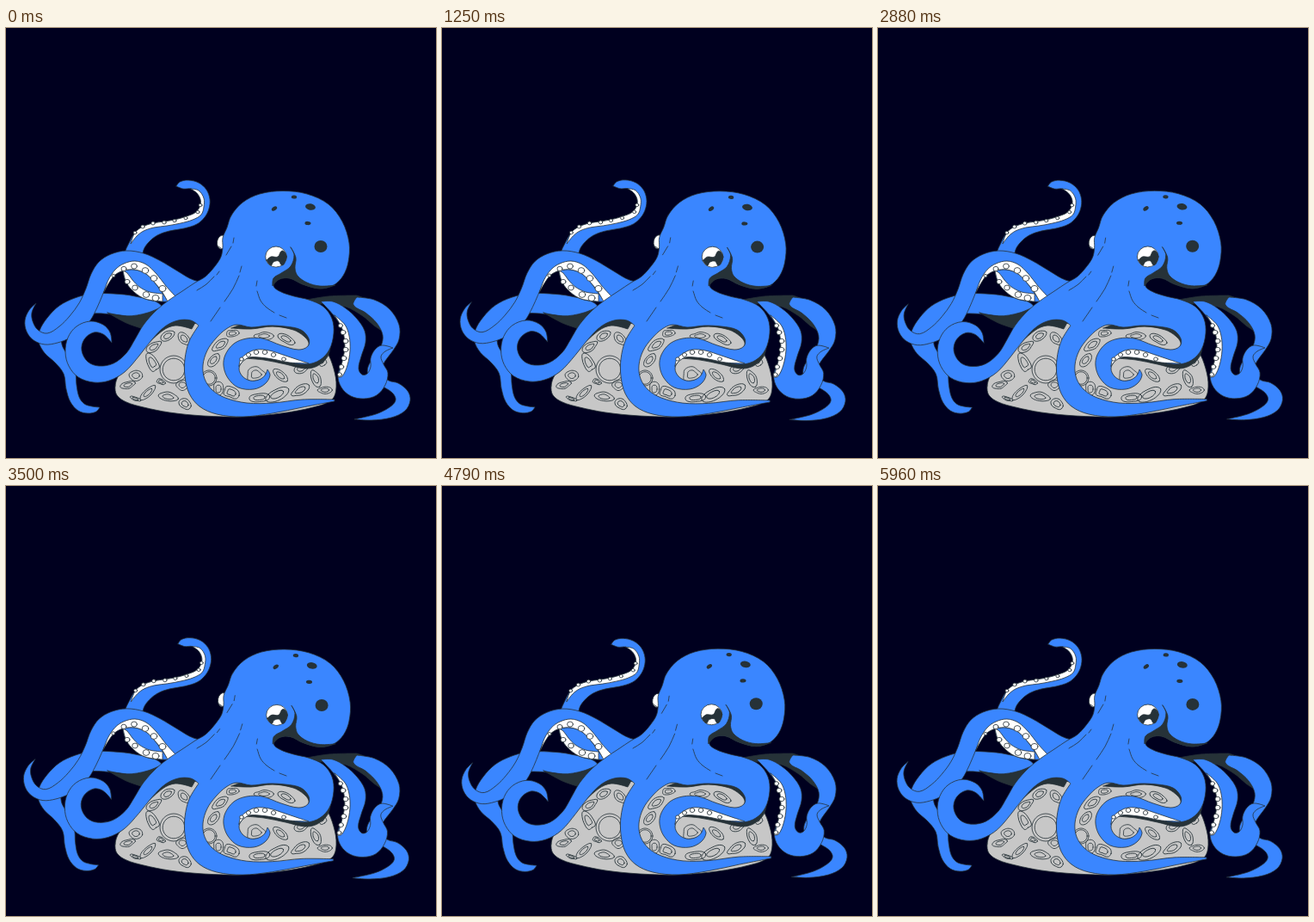
Recreate the animation shown at these times as an HTML page. Size 500x500 px, loop 6 s.

```html
<!DOCTYPE html>
<html lang="en">
<head>
<meta charset="utf-8">
<title>Octopus</title>
<style>
html, body { margin: 0; width: 100%; height: 100%; overflow: hidden; background: #00001f; }
svg { display: block; width: 100vw; height: 100vh; }
svg * { stroke-linejoin: round; stroke-linecap: round; }
</style>
</head>
<body>
<svg id="stage" viewBox="0 0 500 500">
  <defs><clipPath id="rockClip"><path id="rockEdge"/></clipPath></defs>
</svg>
<script>
const NS = "http://www.w3.org/2000/svg";
const stage = document.getElementById("stage");
const BLUE = "#3a86ff", INK = "#263238", WHITE = "#fff", GREY = "#c7c7c7";
const PERIOD = 3000;
const moving = [];

// ---- motion: each field gives the shift of a point at full swing ----
const ramp = (a, b, v) => {
  const u = Math.min(1, Math.max(0, (v - a) / (b - a)));
  return u * u * (3 - 2 * u);
};
const spin = (px, py, angle, weight) => (x, y) => {
  const k = angle * weight(x, y);
  return [-(y - py) * k, (x - px) * k];
};
const sum = (...fields) => (x, y) => fields.reduce((acc, f) => {
  const d = f(x, y);
  return [acc[0] + d[0], acc[1] + d[1]];
}, [0, 0]);

const headField = spin(290, 335, 0.016, (x, y) => ramp(330, 275, y) * ramp(225, 258, x));
const curlField = spin(200, 340, 0.022, x => ramp(195, 120, x));
const frontField = (x, y) => {
  const k = ramp(255, 382, x) * ramp(422, 432, y);
  return [-1.4 * k, 2 * k];
};
const bodyField = sum(headField, curlField, frontField);
const raisedField = (x, y) => {
  const k = Math.max(0, 265 - y);
  return [0.026 * k, -0.006 * k];
};
const loopField = spin(155, 275, 0.025, x => ramp(170, 95, x));
const backField = spin(130, 330, 0.019, x => ramp(150, 95, x));
const outerField = spin(370, 345, 0.021, (x, y) => Math.max(ramp(405, 440, x), ramp(370, 410, y)));
const innerField = spin(370, 345, 0.012, (x, y) => ramp(345, 420, y));

// ---- shapes: smooth curves through points, "!" marks a corner ----
const points = text => text.trim().split(/\s+/).map(word => {
  const [x, y] = word.replace("!", "").split(",").map(Number);
  return { x, y, corner: word.endsWith("!") };
});

function curve(pts, closed) {
  const n = pts.length;
  const at = i => closed ? pts[(i + n) % n] : pts[Math.min(n - 1, Math.max(0, i))];
  const handle = (i, dir) => {
    const p = at(i);
    if (p.corner) return [p.x, p.y];
    const a = at(i - 1), b = at(i + 1), near = dir > 0 ? b : a;
    const span = Math.hypot(b.x - a.x, b.y - a.y) || 1;
    const k = dir * Math.hypot(near.x - p.x, near.y - p.y) / span / 3;
    return [p.x + (b.x - a.x) * k, p.y + (b.y - a.y) * k];
  };
  const fmt = v => v.map(c => c.toFixed(2)).join(" ");
  let d = `M${fmt([pts[0].x, pts[0].y])}`;
  for (let i = 0; i < (closed ? n : n - 1); i++) {
    const q = at(i + 1);
    d += `C${fmt(handle(i, 1))} ${fmt(handle(i + 1, -1))} ${fmt([q.x, q.y])}`;
  }
  return closed ? d + "Z" : d;
}

function add(tag, attrs, parent = stage) {
  const el = document.createElementNS(NS, tag);
  for (const key in attrs) el.setAttribute(key, attrs[key]);
  return parent.appendChild(el);
}

function shape(text, fill, field, stroke = INK, closed = true) {
  const pts = points(text);
  const el = add("path", { fill, stroke, "stroke-width": 0.8, d: curve(pts, closed) });
  if (!field) return;
  const shifts = pts.map(p => field(p.x, p.y));
  moving.push(s => el.setAttribute("d", curve(pts.map((p, i) => ({
    x: p.x + s * shifts[i][0], y: p.y + s * shifts[i][1], corner: p.corner
  })), closed)));
}

const line = (text, field) => shape(text, "none", field, INK, false);

function oval(x, y, rx, ry, turn, fill, field, stroke = "none") {
  const el = add("ellipse", { rx, ry, fill, stroke, "stroke-width": 0.8 });
  const [dx, dy] = field ? field(x, y) : [0, 0];
  const place = s => el.setAttribute("transform",
    `translate(${(x + s * dx).toFixed(2)} ${(y + s * dy).toFixed(2)}) rotate(${turn})`);
  place(0);
  if (field) moving.push(place);
}

function suckers(text, field) {
  for (const word of text.split(" ")) {
    const [x, y, r] = word.split(",").map(Number);
    oval(x, y, r, r * 0.9, 0, WHITE, field, INK);
  }
}

// ---- arms behind the rock ----
shape(`180,322 150,312 125,309 100,309 80,314 62,323 48,337 39,352 38,365 45,378 57,389 67,402 70,420
  75,435 84,445 95,448 105,446 109,441! 100,440 91,437 85,429 82,415 81,402 77,390 70,378 65,368
  65,355 71,343 83,336 100,332 125,333 150,336 175,336`, BLUE, backField);
shape(`118,331! 140,335 165,331 190,320! 178,334 157,349! 140,343`, INK);

shape(`198,184! 202,179 212,177 224,180 233,188 237,199 236,210 231,220 222,228 207,233 190,236 176,241
  166,249 160,258 159,270 170,288 200,305! 197,318! 178,318 162,315 149,307 140,296 136,282 138,262
  143,250 150,238 159,231 171,227 184,225 196,223 210,219 221,214 226,206 226,199 222,192 215,187 206,187`,
  BLUE, raisedField);
shape(`215,187! 224,189 230,198 230,208 227,217 217,223 203,227 187,230 172,232 160,236 152,242 145,251!
  150,238 159,231 171,227 184,225 196,223 210,219 221,214 226,206 226,199 222,192`, WHITE, raisedField);
suckers("226,206,2 223,214,2 209,221,2 196,224,2 184,226,2.2 171,227,2.2 159,231,2.2 150,238,2", raisedField);
shape(`136,282! 141,285 147,293 155,301 167,307 182,309! 182,318! 162,315 149,307 140,296`, WHITE);
suckers("141,295,3 150,302,3.3 163,310,3.8 174,314,4");

shape(`240,297! 218,293 200,283 180,271 160,262 140,259 122,263 108,272 99,286 93,303 85,320 74,335 62,347
  48,355 37,351 31,341 30,331 35,320! 27,328 22,340 24,353 32,363 45,368 60,366 75,360 88,351 98,340
  106,325 112,311 118,297 126,286 137,282 150,281 163,286 173,296 188,317! 220,312!`, BLUE, loopField);
shape(`114,307! 119,293 127,281 137,274 150,271 163,275 175,286 186,300 198,313! 188,318! 181,306 172,295
  163,286 150,281 137,282 127,287 120,296`, WHITE, loopField);
suckers("125,288,2 137,280,3 149,277,3.4 162,282,3.8 172,291,3.8 182,303,4", loopField);

// ---- rock ----
const rock = `127,416 129,427 140,435 160,441 190,447 230,451 275,452 320,448 357,441 379,432 384,417 381,396
  372,375 355,358 330,349 290,346 240,344 200,344 181,350 164,364 146,385 131,404`;
document.getElementById("rockEdge").setAttribute("d", curve(points(rock), true));
shape(rock, GREY);

const craterSets = [
  `195,397,16,16,0 170,389,11,6,60 151,404,7,6,10 142,415,8,4,-15 165,424,10,4,-45 188,429,11,5,10
   208,437,7,6,20 172,371,9,5,-35 188,358,9,5,-30 207,361,8,5,50 205,415,7,6,0 180,411,5,3,20 150,431,6,2,20
   236,407,9,9,0`,
  `241,386,8,5,-50 250,368,11,5,-35 263,355,7,4,0 262,424,9,6,20 247,420,6,8,0 291,403,11,8,0 315,426,13,6,-25
   319,404,9,5,40 343,396,9,5,-20 342,421,11,5,-30 360,407,10,5,65 371,421,8,4,0 366,386,8,5,55
   300,358,10,4,0 325,361,11,5,25 294,430,12,5,-10`
];
const craters = add("g", { "clip-path": "url(#rockClip)", fill: "none", stroke: INK, "stroke-width": 0.8 });
let seed = 7;
const random = () => (seed = (seed * 16807) % 2147483647) / 2147483647;
for (const word of craterSets.join(" ").trim().split(/\s+/)) {
  const [x, y, rx, ry, turn] = word.split(",").map(Number);
  const wobble = Array.from({ length: 8 }, () => rx === ry ? 1 : 0.85 + 0.35 * random());
  for (const size of [1, rx === ry ? 0.8 : 0.55]) {
    const ring = wobble.map((w, i) => {
      const a = i * Math.PI / 4;
      return { x: rx * size * w * Math.cos(a), y: ry * size * w * Math.sin(a) };
    });
    add("path", { d: curve(ring, true), transform: `translate(${x} ${y}) rotate(${turn})` }, craters);
  }
}

// ---- shadows on the rock ----
shape("158,374! 174,348 195,337 222,339! 216,350! 197,346 182,352", INK);
shape("262,349! 290,341 330,343 349,350 357,362 350,374! 352,366 346,358 334,351 310,347 285,350", INK);
shape("276,384! 290,378 315,382 345,388 365,380 378,366! 374,382 362,393 348,396 325,391 300,386", INK);

// ---- right arms ----
shape(`345,317! 375,312 408,311! 425,320 437,352! 428,346 415,335 395,324 375,322`, INK);
shape(`408,313! 428,316 446,327 457,345 457,362 450,375 441,387 437,396 438,403 445,410 456,413 467,422
  470,433 464,445 448,453 425,456 405,455! 430,449 446,441 453,433 450,425 440,418 428,412 421,404
  421,394 428,382 436,370 438,357 431,343 418,331 404,322`, BLUE, outerField);
shape(`366,318! 380,318 395,326 408,338 417,352 418,366 413,382 410,396 414,403 420,402 424,394 424,384
  429,374 437,369 450,372! 441,376 436,382 439,391 444,401 441,415 431,427 416,431 401,428 390,418
  386,404 391,388 394,370 391,350 380,333`, BLUE, innerField);
shape(`382,334! 394,345 399,358 400,375 397,392 391,405 386,406! 391,388 394,370 391,350`, WHITE, innerField);
suckers("389,346,2.6 392,354,3 395,364,3 395,374,3 393,384,3 390,394,2.8 388,403,2.5", innerField);

// ---- body ----
oval(251, 249, 5.5, 8, 10, WHITE, headField, INK);
line("247,254 250,256", headField);

const head = `262,218 275,203 295,193 322,189.5 350,193 375,205 391,225 399,250 398,272 392,288 381,299
  365,303 345,298 330,291 318,292 311,299 318,306 335,312 352,316 369,324`;
const spiral = `379,338 381,355 376,374 365,386 350,391 330,389 310,385 295,383 283,383 275,388 271,396
  275,405 284,410 294,409 301,404 304,397! 307,404 301,414 288,420 270,418 258,407 253,393 255,380
  265,367 280,361 298,361 320,369 340,374 351,370 352,361 343,351 325,347 305,346 285,348 268,345`;
const front = `256,350 244,361 234,375 229,392 231,408 240,421 255,430 280,436 310,436 345,432 382,432!
  382,434! 345,441 310,448 275,452 245,449 225,440 213,425 208,405 208,385 213,364 224,346!`;
const curl = `215,340 200,340 185,347 170,362 155,381 138,400 120,410 102,412 84,406 73,393 69,377 72,360
  82,347 98,341 113,345 121,354 123,366! 113,356 102,354 91,362 88,375 95,388 108,393 125,390 140,378
  150,362 160,345 175,328 190,316 205,306 220,296 232,289 243,277 250,266 252,255 252,244 257,232`;
shape([head, spiral, front, curl].join(" "), BLUE, bodyField);

shape(`271,393! 273,385 281,378 291,374 306,375 325,381 340,386 352,390! 330,389 310,385 295,383 283,383
  275,388`, WHITE);
suckers("274,385,2.3 282,380,2.6 291,377,2.8 301,377,2.8 311,380,2.7 323,385,2.4");

// ---- face ----
shape(`331,255! 335,264 331,277 320,285 311,291 310,300! 318,292 330,291 345,298 365,303 383,299!
  365,300 350,296 339,288 336,279 337,267`, INK, headField);
oval(314, 266, 12.3, 12, 0, WHITE, headField, INK);
shape("303,270! 308,266 316,266 321,259 326,264 325,271 321,276 317,271 311,272 308,276", INK, headField);
oval(314, 275, 4, 2.2, -10, WHITE, headField);

oval(312, 210, 3.5, 2.2, -35, INK, headField);
oval(335, 196.5, 3.2, 2.1, 5, INK, headField);
oval(354, 208, 6, 3.7, 10, INK, headField);
oval(351, 227, 3.6, 2.1, 5, INK, headField);
oval(366, 254, 7.5, 7, 0, INK, headField);

["265,244 264,250", "262,254 256,264", "248,283 245,287", "242,289 233,298 222,305",
  "274,277 272,284", "271,288 264,303 254,318", "249,325 238,341",
  "292,294 291,300", "292,306 296,317 303,325 312,331", "318,334 326,337"
].forEach(text => line(text, headField));

function frame() {
  const s = Math.sin(2 * Math.PI * performance.now() / PERIOD);
  for (const move of moving) move(s);
  requestAnimationFrame(frame);
}
frame();
</script>
</body>
</html>
```
